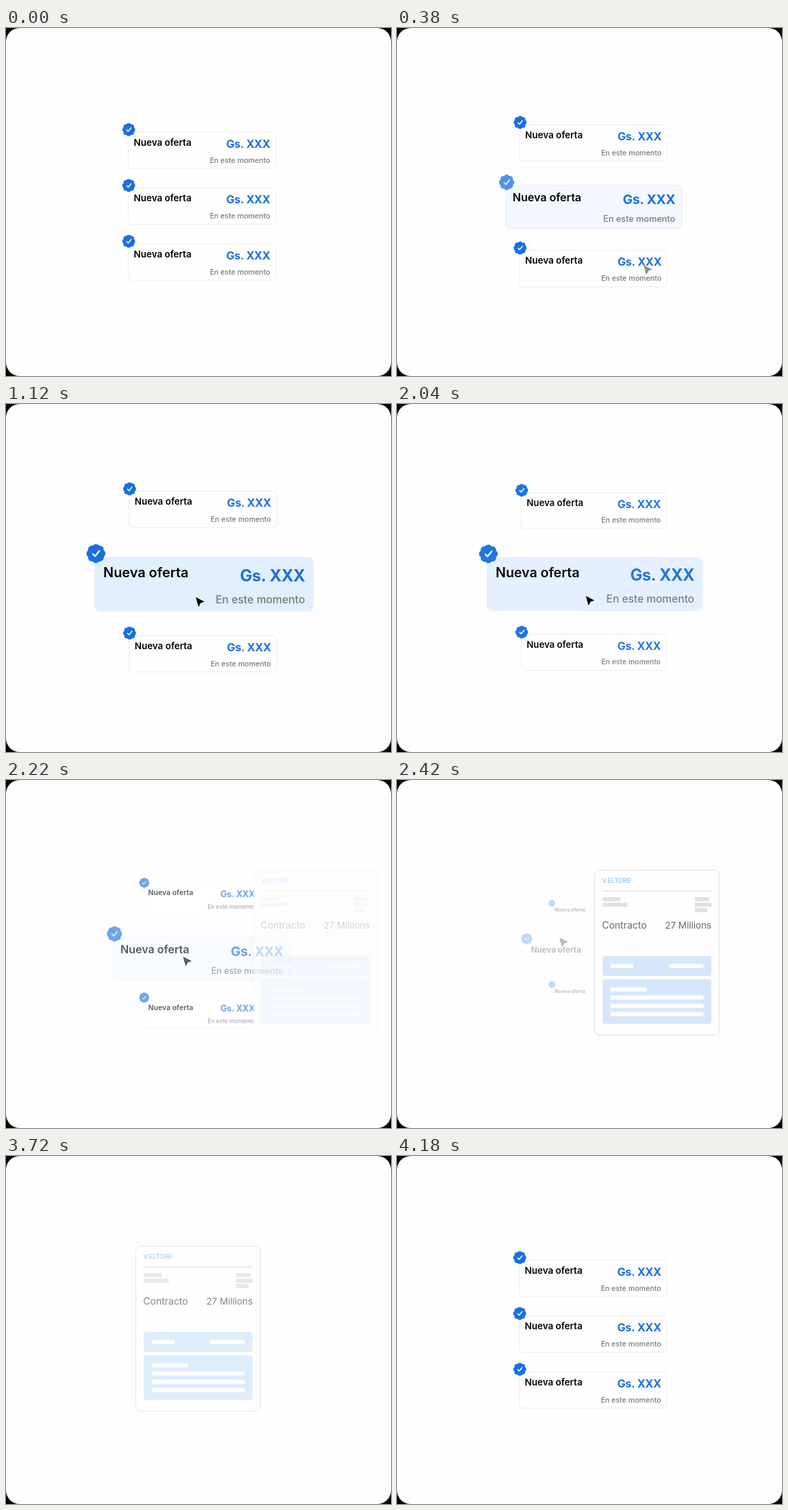
Write an HTML page with a canvas that moves like this. It is 562 px wide and 508 px high and loops after 4.28 s.

```html
<!DOCTYPE html>
<html lang="es">
<head>
<meta charset="utf-8">
<title>Nueva oferta</title>
<style>
html, body { margin: 0; width: 100%; height: 100%; overflow: hidden; background: #000; }
canvas { display: block; width: 562px; height: 508px; }
</style>
</head>
<body>
<canvas id="stage"></canvas>
<script>
const W = 562, H = 508, LOOP = 4280, TICK = 20;
const FONT = 'Inter, "Open Sans", sans-serif';
const BLUE = '#1a70e0', PAPER = '#fefefe';
const canvas = document.getElementById('stage');
const ctx = canvas.getContext('2d');
const dpr = window.devicePixelRatio || 1;
canvas.width = W * dpr;
canvas.height = H * dpr;

const clamp = v => Math.min(1, Math.max(0, v));
const span = (t, from, length) => clamp((t - from) / length);
const mix = (a, b, p) => a + (b - a) * p;
const easeOut = x => x + x * x - x * x * x;
const smooth = x => x * x * (3 - 2 * x);

function box(x, y, w, h, r, fill, stroke) {
  ctx.beginPath();
  ctx.roundRect(x, y, w, h, r);
  if (fill) { ctx.fillStyle = fill; ctx.fill(); }
  if (stroke) { ctx.strokeStyle = stroke; ctx.stroke(); }
}

function text(str, x, y, size, weight, color, align = 'left', tracking = 0) {
  ctx.font = `${weight} ${size}px ${FONT}`;
  ctx.letterSpacing = `${tracking}px`;
  ctx.textAlign = align;
  ctx.fillStyle = color;
  ctx.fillText(str, x, y);
}

function badge(x, y, alpha) {
  ctx.save();
  ctx.translate(x, y);
  ctx.globalAlpha = alpha;
  ctx.beginPath();
  ctx.arc(0, 0, 7, 0, Math.PI * 2);
  for (let i = 0; i < 8; i++) {
    const a = i * Math.PI / 4;
    const cx = 5.5 * Math.cos(a), cy = 5.5 * Math.sin(a);
    ctx.moveTo(cx + 3.9, cy);
    ctx.arc(cx, cy, 3.9, 0, Math.PI * 2);
  }
  ctx.fillStyle = BLUE;
  ctx.fill();
  ctx.globalAlpha = Math.sqrt(alpha);
  ctx.beginPath();
  ctx.moveTo(-3, 0.4);
  ctx.lineTo(-0.9, 2.6);
  ctx.lineTo(3.4, -2.6);
  ctx.strokeStyle = '#fff';
  ctx.lineWidth = 1.5;
  ctx.lineCap = ctx.lineJoin = 'round';
  ctx.stroke();
  ctx.restore();
}

// Card drawn around its centre; tint is the highlight amount.
function card(x, y, scale, alpha, tint) {
  if (alpha <= 0) return;
  const drop = tint * tint;
  ctx.save();
  ctx.translate(x, y);
  ctx.scale(scale, scale);
  ctx.lineWidth = 1 / scale;
  ctx.globalAlpha = alpha ** 2;
  box(-107.75, -26.5, 215.5, 53, 5, PAPER, '#ececec');
  if (tint > 0) {
    ctx.globalAlpha = alpha ** 3 * tint;
    box(-107.75, -26.5, 215.5, 53, 5, '#e2efff', '#e2efff');
  }
  ctx.globalAlpha = alpha;
  text('Nueva oferta', -99.5, -7 + drop * 0.5, 13.45, 600, '#000');
  text('Gs. XXX', 99.6, -4 + drop, 16.2, 700, BLUE, 'right', -0.3);
  text('En este momento', 99.6, 18 + drop, 10.65, 500, '#7a7a7a', 'right');
  badge(-106.8, -30.2, alpha * (1 - tint * (1 - tint)));
  ctx.restore();
}

function cursor(x, y, alpha) {
  if (alpha <= 0) return;
  ctx.save();
  ctx.translate(x, y);
  ctx.globalAlpha = alpha;
  ctx.beginPath();
  [[0, 0], [12.8, 6.6], [7, 8.8], [4, 14.5]].forEach(p => ctx.lineTo(...p));
  ctx.closePath();
  ctx.lineJoin = 'round';
  ctx.lineWidth = 1.6;
  ctx.strokeStyle = '#fff';
  ctx.stroke();
  ctx.fillStyle = '#000';
  ctx.fill();
  ctx.restore();
}

function contract(x, ink) {
  if (ink <= 0) return;
  ctx.save();
  ctx.translate(x, 0);
  ctx.lineWidth = 1;
  ctx.globalAlpha = clamp(ink / 0.3);
  box(0, 131.5, 182, 241, 7, PAPER);
  ctx.globalAlpha = ink;
  box(0, 131.5, 182, 241, 7, null, '#cacaca');

  text('V.ELTORE', 11, 150, 9.3, 400, '#1a8cf0', 'left', -0.1);
  text('™', 51.5, 149.5, 5.5, 400, '#1a8cf0');
  const left = 11.5, right = 170.5, gray = '#d0d0d0', tint = '#bbd9f9';
  box(left, 161.25, 159, 1.5, 0, gray);
  box(left, 171, 26.5, 6, 0, gray);
  box(left, 179, 36.5, 6, 0, gray);
  [21, 24, 18].forEach((w, i) => box(146.5, 171 + i * 8, w, 6, 0, gray));
  text('Contracto', 10.8, 217, 14, 400, '#000');
  text('27 Millions', right, 217, 13.4, 400, '#000', 'right');

  box(left, 257, 159, 29, 4, tint);
  box(left, 291, 159, 65, 4, tint);
  ctx.globalAlpha = clamp(ink / 0.3);
  box(23.5, 268.5, 33, 6, 0, PAPER);
  box(108.5, 268.5, 50.5, 6, 0, PAPER);
  [52.5, 135.5, 135.5, 135.5].forEach((w, i) =>
    box(23.5, 302.5 + i * 12.1, w, 6, 0, PAPER));
  ctx.restore();
}

function offers(t) {
  const p = easeOut(span(t, 15, 1045));
  const grow = p ** 1.08;
  const steps = Math.max(0, (t - 2020) / TICK);
  const k = 20 * (steps / 20) ** 1.1;
  const alpha = clamp(1 - 0.0365 * steps);
  const small = 1 - 0.0233 * k;
  const x = mix(286, 287.2, p) - 0.2 * k;
  card(x, mix(178.5, 154.1, p) + 2.1 * k, small, alpha, 0);
  card(x, mix(341.5, 364.5, p) - 2.48 * k, small, alpha, 0);
  card(mix(286, 289.2, p) - 0.36 * k, mix(260, 263, p) - 0.25 * k,
    1 + 0.479 * grow - 0.0306 * k, alpha, p);
  cursor(mix(422, 277, p) - 2 * k, mix(394, 282, p) - 2.6 * k, p * alpha);
}

function draw(t) {
  ctx.setTransform(dpr, 0, 0, dpr, 0, 0);
  ctx.fillStyle = '#000';
  ctx.fillRect(0, 0, W, H);
  box(0, 0, W, H, 20, PAPER);

  if (t < 2580) offers(t);
  if (t > 2120 && t < 4180) {
    const x = mix(371.5, 189.5, smooth(span(t, 2128, 620)));
    const ink = t < 3720
      ? 0.6 * span(t, 2140, 280) + 0.05 * span(t, 2420, 200)
      : 0.48 * (1 - span(t, 3720, 460));
    contract(x, ink);
  }
  if (t >= 3720) {
    const a = span(t, 3720, 460);
    [178.5, 260, 341.5].forEach(y => card(286, y, 1, a, 0));
  }
}

const start = performance.now();
function frame() {
  const t = (performance.now() - start) % LOOP;
  draw(Math.floor(t / TICK) * TICK);
  requestAnimationFrame(frame);
}
frame();
</script>
</body>
</html>
```
